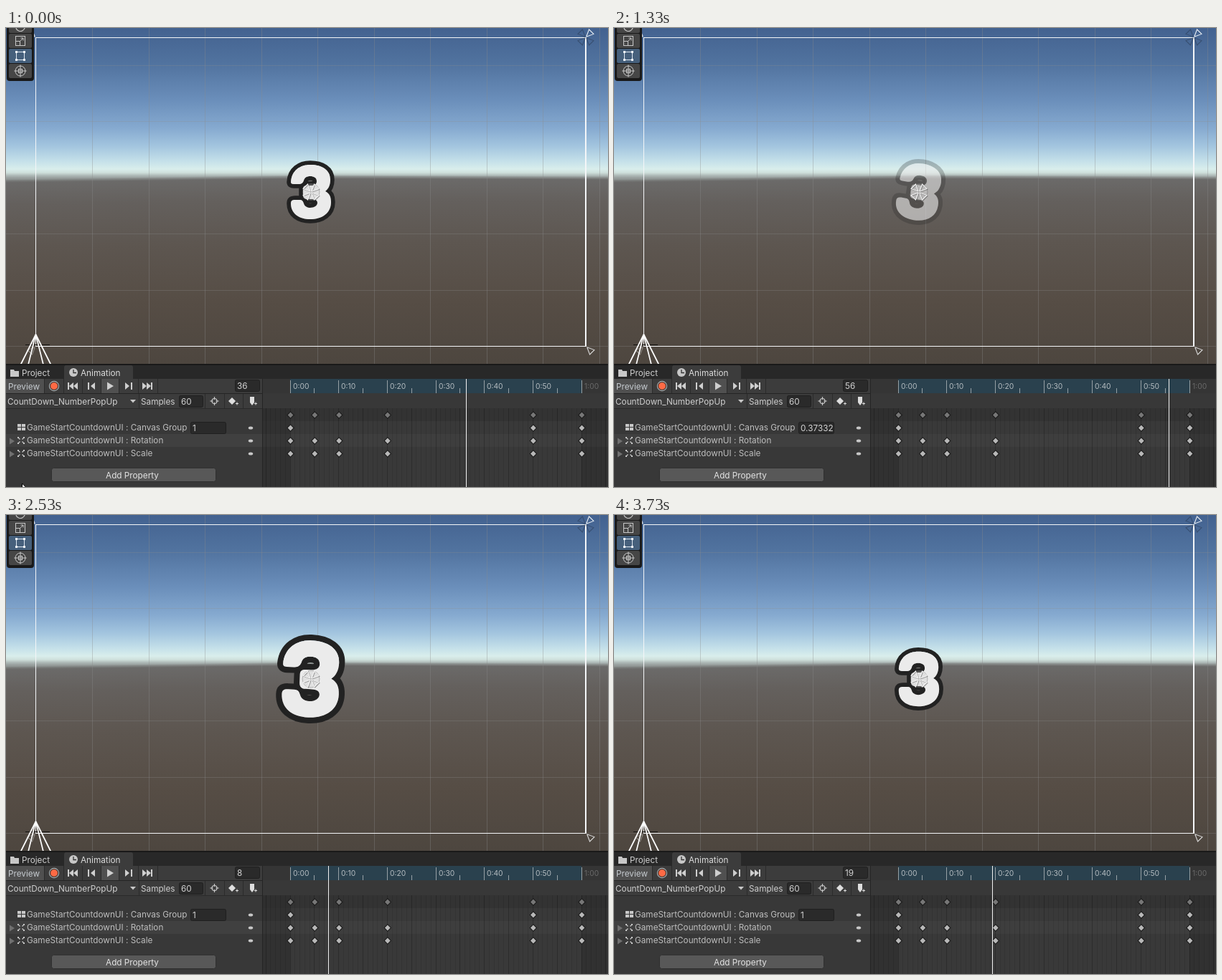
An HTML page with a canvas that plays this animation: 839x641 px, repeating every 3.8 s.

```html
<!DOCTYPE html>
<html lang="en">
<head>
<meta charset="utf-8">
<title>Countdown pop-up</title>
<style>
  html, body { margin: 0; width: 100%; height: 100%; overflow: hidden; background: #383838; }
  canvas { display: block; }
</style>
</head>
<body>
<canvas id="stage" width="839" height="641"></canvas>
<script>
const W = 839, H = 641, LOOP = 3800, STEP = 200 / 3;
const CX = 425, CY = 229;
const KEYS = [0, 5, 10, 20, 50, 60];
const FONT = 'Inter, "Noto Sans", sans-serif';
const stage = document.getElementById('stage').getContext('2d');

function layer() {
  const c = document.createElement('canvas');
  c.width = W;
  c.height = H;
  return c.getContext('2d');
}
const back = layer(), digit = layer();

// ---------- drawing helpers ----------
function rect(g, x, y, w, h, color) {
  g.fillStyle = color;
  g.fillRect(x, y, w, h);
}
function round(g, x, y, w, h, r, color, border) {
  g.beginPath();
  g.roundRect(x, y, w, h, r);
  g.fillStyle = color;
  g.fill();
  if (border) { g.strokeStyle = border; g.lineWidth = 1; g.stroke(); }
}
function text(g, s, x, y, color = '#cfcfcf', size = 11.75, align = 'left') {
  g.font = `${size}px ${FONT}`;
  g.textAlign = align;
  g.textBaseline = 'alphabetic';
  g.fillStyle = color;
  g.fillText(s, x, y);
}
function line(g, color, width, ...p) {
  g.beginPath();
  for (let i = 0; i < p.length; i += 2) g.lineTo(p[i], p[i + 1]);
  g.strokeStyle = color;
  g.lineWidth = width;
  g.stroke();
}
function poly(g, color, ...p) {
  g.beginPath();
  for (let i = 0; i < p.length; i += 2) g.lineTo(p[i], p[i + 1]);
  g.closePath();
  g.fillStyle = color;
  g.fill();
}
function circle(g, x, y, r, fill, stroke, width = 1) {
  g.beginPath();
  g.arc(x, y, r, 0, 7);
  if (fill) { g.fillStyle = fill; g.fill(); }
  if (stroke) { g.strokeStyle = stroke; g.lineWidth = width; g.stroke(); }
}
function diamond(g, x, y, color) {
  poly(g, '#1c1c1c', x, y - 5.5, x + 5.5, y, x, y + 5.5, x - 5.5, y);
  poly(g, color, x, y - 3.9, x + 3.9, y, x, y + 3.9, x - 3.9, y);
}
function wedge(g, x, y, angle, color) {
  g.save();
  g.translate(x, y);
  g.rotate(angle);
  line(g, color, 1.1, 1, 0, 11, -4.5, 11, 4.5, 1, 0);
  g.restore();
}
function gradient(g, stops) {
  const fill = g.createLinearGradient(0, 0, 0, 470);
  for (const [y, c] of stops) fill.addColorStop(y / 470, c);
  return fill;
}
const frameX = f => 396 + 6.767 * f;

// ---------- scene view ----------
function drawScene(g) {
  rect(g, 0, 0, W, 470, gradient(g, [
    [0, '#436290'], [50, '#51739f'], [100, '#6a8eba'], [140, '#86aad0'], [165, '#a3c5df'],
    [185, '#c3dfe9'], [197, '#d9eeec'], [202, '#cfe0dc'], [207, '#a6b0ae'], [215, '#7f8381']]));
  // The ground's edge bends down towards both sides.
  g.fillStyle = gradient(g, [
    [205, 'rgba(107,106,105,0)'], [210, '#6b6a69'],
    [240, '#64605d'], [300, '#5d5650'], [380, '#564d45'], [470, '#4d463f']]);
  for (let x = 0; x < W; x++) {
    const dip = x < 430 ? 6 * (1 - x / 430) : 2 * (x - 430) / 409;
    g.setTransform(1, 0, 0, 1, 0, dip);
    g.fillRect(x, 200, 1, 280);
  }
  g.setTransform(1, 0, 0, 1, 0, 0);

  for (let i = 0; i < 10; i++)
    rect(g, Math.round(120 + i * 78.55), 0, 1, 469, 'rgba(140,140,138,.36)');
  for (let i = 0; i < 6; i++)
    rect(g, 0, Math.round(52 + i * 78.45), W, 1, 'rgba(140,140,138,.3)');

  rect(g, 41, 13, 768, 1, '#f4f6f8');
  rect(g, 41, 444, 768, 1, '#f4f6f8');
  rect(g, 41, 13, 1, 432, '#f4f6f8');
  rect(g, 807, 13, 2, 432, '#f4f6f8');

  for (let i = 0; i < 4; i++)
    wedge(g, 808, 13, -Math.PI / 4 + i * Math.PI / 2, i ? 'rgba(40,55,80,.5)' : '#e8eef4');
  wedge(g, 809, 445, Math.PI / 4, '#d8d8d8');
  wedge(g, 41, 445, Math.PI * .75, '#8c8883');
  wedge(g, 41, 13, Math.PI * 1.25, '#dfe6ee');

  rect(g, 27, 442, 34, 1, '#151311');
  for (const dx of [-21, -10.5, 10.5, 21]) line(g, '#fff', 1.7, 41.5, 428, 41.5 + dx, 470);
}

function drawTools(g) {
  round(g, 1, -8, 38, 82, 4, '#191919');
  ['#464646', '#464646', '#46607c', '#464646'].forEach((c, i) =>
    round(g, 4, -13 + i * 21, 32, 20, 2, c));
  const ink = '#c8c8c8';
  g.beginPath();
  g.arc(20, -2, 6.5, .3, 2.8);
  g.strokeStyle = ink;
  g.lineWidth = 1.2;
  g.stroke();
  g.lineWidth = 1;
  g.strokeRect(13.5, 11.5, 13, 13);
  g.strokeRect(13.5, 18.5, 6, 6);
  line(g, ink, 1, 19, 19, 24, 14);
  line(g, ink, 1, 20.5, 14, 24, 14, 24, 17.5);
  g.strokeStyle = '#dce6f0';
  g.strokeRect(14.5, 33.5, 11, 11);
  for (const x of [13, 24]) for (const y of [32, 43]) rect(g, x, y, 3, 3, '#f0f4f8');
  circle(g, 20, 60, 7, null, ink);
  line(g, ink, 1, 20, 51.5, 20, 68.5);
  line(g, ink, 1, 11.5, 60, 28.5, 60);
  g.strokeRect(17.5, 57.5, 5, 5);
}

// ---------- animation panel ----------
function drawTransport(g) {
  rect(g, 0, 490, 53, 20, '#505050');
  rect(g, 133, 490, 24, 20, '#505050');
  for (const x of [53, 80, 106, 132, 157, 184, 211]) rect(g, x, 490, 1, 20, '#2b2b2b');
  text(g, 'Preview', 3, 505, '#c6cbd0');
  circle(g, 67, 500, 6.6, '#2a2a2a', '#b4b4b4', 1.1);
  circle(g, 67, 500, 5, '#ff6a45');
  const ink = '#cfcfcf';
  const tri = (x, d) => poly(g, ink, x, 495, x + 6 * d, 500, x, 505);
  rect(g, 86, 495, 2, 10, ink); tri(94, -1); tri(100, -1);
  rect(g, 114, 495, 2, 10, ink); tri(124, -1);
  poly(g, ink, 141, 494.5, 150, 500, 141, 505.5);
  tri(166, 1); rect(g, 174, 495, 2, 10, ink);
  tri(190, 1); tri(196, 1); rect(g, 202, 495, 2, 10, ink);
}

function drawPanel(g) {
  rect(g, 0, 469, W, 172, '#383838');
  rect(g, 0, 469, W, 2, '#191919');
  rect(g, 0, 471, W, 19, '#282828');
  round(g, 81, 471, 96, 20, [3, 3, 0, 0], '#3c3c3c');
  poly(g, '#c8c8c8', 6, 477, 11, 477, 12, 479, 18, 479, 18, 487, 6, 487);
  text(g, 'Project', 22, 486);
  circle(g, 94, 481, 6, '#c8c8c8');
  line(g, '#333', 1.3, 94, 477, 94, 481.5, 98, 481.5);
  text(g, 'Animation', 104, 486, '#dcdcdc');

  rect(g, 0, 490, 358, 41, '#3c3c3c');
  rect(g, 0, 510, 358, 1, '#242424');
  rect(g, 0, 531, 358, 1, '#2a2a2a');
  drawTransport(g);

  text(g, 'CountDown_NumberPopUp', 2, 526);
  poly(g, '#c8c8c8', 173, 519, 181, 519, 177, 523.5);
  rect(g, 185, 511, 1, 20, '#2b2b2b');
  text(g, 'Samples', 188, 526);
  field(g, 241, 513, 34, '60');
  for (const x of [277, 304, 330]) rect(g, x, 511, 1, 20, '#2b2b2b');
  circle(g, 290.5, 521, 3.5, null, '#c8c8c8', 1.2);
  for (const [dx, dy] of [[1, 0], [-1, 0], [0, 1], [0, -1]])
    line(g, '#c8c8c8', 1.2, 290.5 + dx * 2, 521 + dy * 2, 290.5 + dx * 6, 521 + dy * 6);
  poly(g, '#dedede', 315, 516, 320, 521, 315, 526, 310, 521);
  poly(g, '#dedede', 340, 515, 346, 515, 346, 523, 343, 527, 340, 523);
  for (const x of [320, 346]) {
    rect(g, x, 524, 4, 1, '#dedede');
    rect(g, x + 1.5, 522.5, 1, 4, '#dedede');
  }

  rect(g, 0, 567, 357, 18, '#404040');
  ['Canvas Group', 'Rotation', 'Scale'].forEach((name, i) => {
    const y = 558 + 18 * i;
    text(g, 'GameStartCountdownUI : ' + name, 29, y + 4, '#bebebe');
    g.beginPath();
    g.ellipse(341, y + .5, 3.2, 2, 0, 0, 7);
    g.fillStyle = '#c8c8c8';
    g.fill();
    if (i) {
      poly(g, '#707070', 5, y - 3.5, 12, y + 1, 5, y + 5.5);
      for (const dx of [-1, 1]) for (const dy of [-1, 1]) {
        line(g, '#c8c8c8', 1.3, 21 + dx * 1.5, y + dy * 1.5, 21 + dx * 4.5, y + dy * 4.5);
        rect(g, 20 + dx * 4, y - 1 + dy * 4, 2, 2, '#c8c8c8');
      }
    } else {
      for (const dx of [0, 6]) for (const dy of [0, 5]) rect(g, 16 + dx, y - 5 + dy, 5, 4, '#c8c8c8');
    }
  });
  round(g, 63.5, 614.5, 229, 19, 3, '#585858', '#303030');
  text(g, 'Add Property', 176, 629, '#e4e4e4', 11.75, 'center');
}

function drawTimeline(g) {
  rect(g, 357, 490, 482, 151, '#313131');
  rect(g, 357, 490, 1, 151, '#242424');
  rect(g, 358, 490, 481, 20, '#353535');
  rect(g, 396, 490, 406, 20, '#2a414e');
  rect(g, 358, 510, 481, 21, '#383838');
  rect(g, 358, 531, 481, 18, '#2f2f2f');
  rect(g, 396, 531, 406, 18, '#333');
  rect(g, 396, 549, 406, 92, '#393939');
  rect(g, 358, 567, 481, 18, 'rgba(255,255,255,.025)');
  for (let f = -5; f <= 65; f++) {
    const x = Math.floor(frameX(f));
    rect(g, x, 531, 1, 110, f % 5 ? 'rgba(0,0,0,.09)' : 'rgba(0,0,0,.22)');
    if (f < 0 || f > 60 || f % 5) continue;
    const top = f % 10 ? 503 : 492;
    rect(g, x, top, 1, 510 - top, '#96a0a5');
    if (f % 10 === 0)
      text(g, f < 60 ? '0:' + String(f).padStart(2, '0') : '1:00', x + 4, 504, f < 60 ? '#b4bcc0' : '#696969', 10.3);
  }
  for (const f of KEYS) {
    const x = frameX(f) + .5;
    diamond(g, x, 540.5, '#777');
    if (f === 0 || f > 20) diamond(g, x, 558.5, '#b8b8b8');
    diamond(g, x, 576.5, '#b8b8b8');
    diamond(g, x, 594.5, '#b8b8b8');
  }
}

function field(g, x, y, w, s) {
  round(g, x + .5, y + .5, w - 1, 16, 2, '#2a2a2a', '#1f1f1f');
  g.save();
  g.beginPath();
  g.rect(x + 2, y, w - 4, 17);
  g.clip();
  text(g, s, x + 3, y + 12.5, '#d4d4d4');
  g.restore();
}

// ---------- motion ----------
const RUN = [[0, 36.25], [7, 63.95], [20, 115.8528], [27, 143.4], [35, 175.55603], [42, 204.35], [56, 259.4]];
const SCALE = [[0, 0], [10, 1.6], [20, 1], [50, 1], [60, 1.08]];
const TURN = [[0, 0], [5, -10], [10, 10], [20, 0], [50, 0], [60, 15]];
const ALPHA = [[0, 1], [50, 1], [60, 0]];
const MOUSE_X = [[0, 22], [7, 490], [10, 600]];
const MOUSE_Y = [[0, 636], [7, 442], [10, 660]];
const linear = u => u;
const smooth = u => u * u * (3 - 2 * u);

function track(keys, t, ease = smooth) {
  let i = 1;
  while (i < keys.length - 1 && t > keys[i][0]) i++;
  const [a, va] = keys[i - 1], [b, vb] = keys[i];
  return va + (vb - va) * ease((t - a) / (b - a));
}

// Outer contour of the numeral, then its inner edge back to the start.
const THREE = new Path2D(
  'M-28-14C-27-30-15-38-1-38C15-38 27-31 27-17C27-9 24-4 20-1' +
  'C26 2 28 7 28 14C28 30 15 38-1 38C-17 38-28 30-28 16' +
  'C-28 12-26 11-22 11L-16 11C-12 11-11 13-10 16C-9 20-5 22-1 22' +
  'C5 22 9 19 9 15C9 11 5 10 0 10L-5 10C-9 10-11 8-11 4L-11-4' +
  'C-11-8-9-9-5-9L0-9C5-9 8-11 8-15C8-20 4-22-1-22' +
  'C-6-22-9-20-10-16C-11-13-13-11-17-11L-24-11C-27-11-28-12-28-14Z');

function drawDigit(scale, turn, alpha) {
  const g = digit;
  g.setTransform(1, 0, 0, 1, 0, 0);
  g.clearRect(0, 0, W, H);
  g.translate(CX, CY);
  g.rotate(turn * Math.PI / 180);
  g.scale(scale, scale);
  g.lineJoin = 'round';
  g.lineWidth = 11.5;
  const paint = (method, color, a, mode) => {
    g.fillStyle = g.strokeStyle = color;
    g.globalAlpha = a;
    g.globalCompositeOperation = mode;
    g[method](THREE);
  };
  // Exponents imitate blending in linear light.
  paint('stroke', '#222', alpha ** 1.35, 'source-over');
  paint('fill', '#000', 1, 'destination-out');
  paint('fill', '#ebebeb', alpha ** .55, 'source-over');
  stage.drawImage(digit.canvas, 0, 0);
}

function drawPivot(g) {
  circle(g, CX, CY, 12, 'rgba(200,200,200,.3)', 'rgba(60,60,60,.3)');
  for (let i = 0; i < 4; i++) {
    const a = Math.PI / 4 + i * Math.PI / 2;
    wedge(g, CX + 1, CY + 1, a, 'rgba(50,50,50,.4)');
    wedge(g, CX, CY, a, '#f2f2f2');
  }
}

function drawMouse(g, x, y) {
  g.save();
  g.translate(x, y);
  g.beginPath();
  for (const [px, py] of [[.5, 0], [.5, 15.5], [4, 12.2], [6.6, 18], [9, 17], [6.6, 11.3], [11.3, 11]]) g.lineTo(px, py);
  g.closePath();
  g.fillStyle = '#fff';
  g.fill();
  g.strokeStyle = '#000';
  g.lineWidth = 1;
  g.stroke();
  g.restore();
}

function render(time) {
  const k = Math.min(56, Math.floor((time % LOOP + 5) / STEP));
  const f = track(RUN, k, linear) % 60;
  const alpha = track(ALPHA, f);
  stage.drawImage(back.canvas, 0, 0);
  const scale = track(SCALE, f);
  if (scale > .001 && alpha > .001) drawDigit(scale, track(TURN, f), alpha);
  drawPivot(stage);
  field(stage, 319, 491, 35, String(Math.round(f)));
  field(stage, 257, 550, 50, String(+alpha.toFixed(7)));
  rect(stage, Math.floor(frameX(f)), 490, 1, 151, '#f2f2f2');
  if (k < 10) drawMouse(stage, track(MOUSE_X, k, linear), track(MOUSE_Y, k, linear));
}

drawScene(back);
drawTools(back);
drawPanel(back);
drawTimeline(back);

let start;
function tick(now) {
  start ??= now;
  render(now - start);
  requestAnimationFrame(tick);
}
render(0);
requestAnimationFrame(tick);
</script>
</body>
</html>
```
